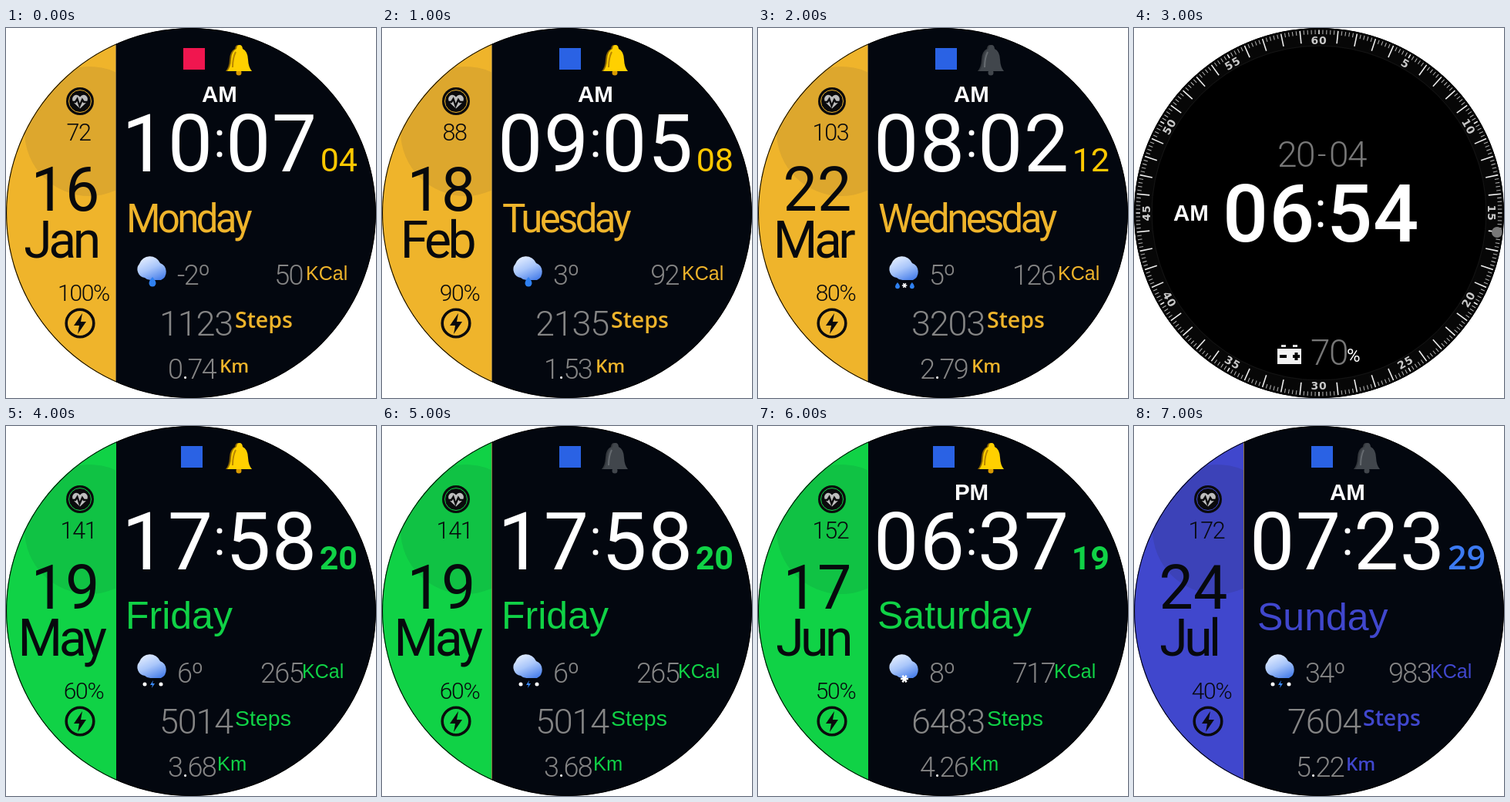
Animation, 480 px wide and 480 px high, one loop 8 s. Source, as an HTML page:

```html
<!DOCTYPE html>
<html lang="en">
<head>
<meta charset="utf-8">
<title>Watch face</title>
<style>
html, body { margin: 0; width: 100%; height: 100%; overflow: hidden; background: #fff; }
svg { display: block; width: 100vw; height: 100vh; }
text { font-family: Roboto, sans-serif; white-space: pre; }
.arial { font-family: "Liberation Sans", Arial, sans-serif; }
.open { font-family: "Open Sans", "Noto Sans", sans-serif; }
.ring { font-family: "DejaVu Sans", sans-serif; font-weight: 700; }
.scene { visibility: hidden; animation: show 8s step-end infinite; }
@keyframes show {
  0% { visibility: visible; }
  12.5%, 100% { visibility: hidden; }
}
</style>
</head>
<body>
<svg id="stage" viewBox="0 0 480 480">
  <defs>
    <clipPath id="dial"><circle cx="240" cy="240" r="240"/></clipPath>
    <clipPath id="side"><rect width="142" height="480"/></clipPath>
    <linearGradient id="sky" x1=".2" y1="0" x2=".75" y2="1">
      <stop offset="0" stop-color="#e6efff"/>
      <stop offset=".5" stop-color="#a9c6fa"/>
      <stop offset="1" stop-color="#4a80ea"/>
    </linearGradient>
    <path id="cloud" fill="url(#sky)" d="M180 324a11 11 0 0 1-7-18a14.500 14.500 0 0 1 27-1a12 12 0 0 1 1 22h-12a11 11 0 0 1-9-3z"/>
    <path id="drop" d="M0-6q4.500 5 4.500 8a4.500 4.500 0 0 1-9 0q0-3 4.500-8z" fill="#2f80f0"/>
    <path id="flake" d="M-5 0H5M-2.500-4.300L2.500 4.300M2.500-4.300L-2.500 4.300" stroke="#fff" stroke-width="2.400"/>
    <path id="flash" d="M1-5L-3 1H0L-1 5L3-1H0z" fill="#3b8cff"/>
    <path id="bell" d="M302 22q3.500 0 4 5q6.500 3 7 14q.5 10 5 15H286q4.500-5 5-15q.5-11 7-14q.5-5 4-5z"/>
  </defs>
  <g clip-path="url(#dial)">
    <g id="face"></g>
    <circle cx="240" cy="240" r="239.500" fill="none" stroke="#000" stroke-width="1.200"/>
  </g>
</svg>
<script>
const themes = {
  gold: { main: '#efb42b', mark: '#dda72d', sec: '#ffc800', secFont: '', secWeight: 400, edge: 142, unit: 'open', kcalX: 389, kmX: 277 },
  green: { main: '#10d246', mark: '#10c244', sec: '#10d246', secFont: '', secWeight: 700, edge: 143, unit: 'arial', kcalX: 384, kmX: 274 },
  blue: { main: '#4047cd', mark: '#3c42b8', sec: '#3c7af2', secFont: 'open', secWeight: 600, edge: 142, unit: 'open', kcalX: 384, kmX: 275 }
};

const scenes = [
  { theme: 'gold', hour: '10', min: '07', sec: '04', half: 'AM', day: 'Monday', date: 16, month: 'Jan', pulse: 72,
    battery: 100, temp: '-2', kcal: 50, steps: 1123, km: '0.74', sky: 'rain', bell: true, link: '#f0164f' },
  { theme: 'gold', hour: '09', min: '05', sec: '08', half: 'AM', day: 'Tuesday', date: 18, month: 'Feb', pulse: 88,
    battery: 90, temp: '3', kcal: 92, steps: 2135, km: '1.53', sky: 'rain', bell: true },
  { theme: 'gold', hour: '08', min: '02', sec: '12', half: 'AM', day: 'Wednesday', date: 22, month: 'Mar', pulse: 103,
    battery: 80, temp: '5', kcal: 126, steps: 3203, km: '2.79', sky: 'sleet' },
  null,
  { theme: 'green', hour: '17', min: '58', sec: '20', half: '', day: 'Friday', date: 19, month: 'May', pulse: 141,
    battery: 60, temp: '6', kcal: 265, steps: 5014, km: '3.68', sky: 'storm', bell: true },
  null,
  { theme: 'green', hour: '06', min: '37', sec: '19', half: 'PM', day: 'Saturday', date: 17, month: 'Jun', pulse: 152,
    battery: 50, temp: '8', kcal: 717, steps: 6483, km: '4.26', sky: 'snow', bell: true },
  { theme: 'blue', hour: '07', min: '23', sec: '29', half: 'AM', day: 'Sunday', date: 24, month: 'Jul', pulse: 172,
    battery: 40, temp: '34', kcal: 983, steps: 7604, km: '5.22', sky: 'storm' }
];
scenes[5] = { ...scenes[4], bell: false, line: true };

const text = (str, x, y, size, fill, { cls = '', weight = 400, anchor = 'start', gap = 0 } = {}) =>
  `<text class="${cls}" x="${x}" y="${y}" font-size="${size}" fill="${fill}" font-weight="${weight}" ` +
  `text-anchor="${anchor}" letter-spacing="${gap}">${str}</text>`;
const rect = (x, y, w, h, fill) => `<rect x="${x}" y="${y}" width="${w}" height="${h}" fill="${fill}"/>`;
const disc = (x, y, r, fill, extra = '') => `<circle cx="${x}" cy="${y}" r="${r}" fill="${fill}" ${extra}/>`;
const use = (id, x = 0, y = 0, extra = '') => `<use href="#${id}" transform="translate(${x} ${y})" ${extra}/>`;

function clock(hour, min, x, y, weight) {
  const opt = { weight, gap: 1.2 };
  return text(hour, x, y, 104, '#fff', opt) + text(min, x + 135, y, 104, '#fff', opt) +
    disc(x + 127, y - 50, 3.5, '#fff') + disc(x + 127, y - 22, 3.5, '#fff');
}

const fall = {
  rain: use('drop', 190, 329),
  sleet: `<g transform="translate(181 334) scale(.65)">${use('drop')}${use('flake', 14)}${use('drop', 29)}</g>`,
  storm: disc(180, 335, 2.5, '#fff') + use('flash', 190, 335) + disc(201, 335, 2.5, '#fff'),
  snow: use('flake', 190, 328)
};

function bell(on) {
  const [back, body, shine, clapper] = on
    ? ['#8a6500', '#ffd000', '#b98700', '#d99a00']
    : ['#34383d', '#41464c', '#666b70', '#41464c'];
  return use('bell', -1, 0, `fill="${back}"`) + disc(302, 58, 3.5, clapper) + use('bell', 1, 0, `fill="${body}"`) +
    `<path d="M298 31q-4 8-4 20" fill="none" stroke="${shine}" stroke-width="2"/>`;
}

function sideIcons(color) {
  return disc(96, 95, 18, '#0a0a0c') + disc(96, 95, 14.5, 'none', `stroke="${color}" stroke-width="1"`) +
    '<path d="M96 104.500l-8-7.500q-4-5 0-9q4.500-3 8 1.500q3.500-4.500 8-1.500q4 4 0 9z" fill="#bdbdbd"/>' +
    '<path d="M83 96h7l2.500-4l3 9l3.500-8l2 3h8" fill="none" stroke="#0a0a0c" stroke-width="2.400"/>' +
    disc(96, 383, 17.8, 'none', 'stroke="#0a0a0c" stroke-width="3.6"') +
    '<path d="M99 370L88 386h7l-2 11l11-16h-7z" fill="#0a0a0c"/>';
}

function weekday(s, t) {
  if (s.theme === 'gold') return text(s.day, 156, 265, 51, t.main, { gap: -3.7 });
  return text(s.day, s.theme === 'blue' ? 160 : 155, s.theme === 'blue' ? 265 : 263, 50, t.main, { cls: 'arial' });
}

function mainFace(s) {
  const t = themes[s.theme], ink = '#07090d', gray = '#858585';
  const mid = { weight: 300, anchor: 'middle', gap: -1.3 };
  const small = { weight: 300, gap: -1.6 };
  const open = t.unit === 'open';
  const unit = { cls: t.unit, weight: open ? 600 : 400 };
  const line = t.edge === 142 || s.line;
  const [whole, part] = s.km.split('.');
  return rect(0, 0, 480, 480, '#03070f') + rect(0, 0, t.edge, 480, t.main) +
    disc(108, 134, 84, t.mark, 'clip-path="url(#side)"') +
    (line ? rect(142, 0, 1, 480, '#8d7440') : '') +
    sideIcons(t.main) +
    text(s.pulse, 94, 146, 30.5, ink, mid) +
    text(s.date, 77, 237, 79, ink, { anchor: 'middle' }) +
    text(s.month, 71, 298, 66, ink, { anchor: 'middle', gap: -4.5 }) +
    text(s.battery + '%', 100.5, 354, 30, ink, mid) +
    rect((line ? 244 : 241) - 14, 26, 28, 28, s.link || '#2a62e4') + bell(s.bell) +
    text(s.half, 277, 96, 29.5, '#fff', { cls: 'arial', weight: 700, anchor: 'middle' }) +
    clock(s.hour, s.min, 150, 186, 400) +
    text(s.sec, 456, 186, 43, t.sec, { weight: t.secWeight, anchor: 'end', cls: t.secFont }) +
    weekday(s, t) +
    use('cloud') + fall[s.sky] +
    text(s.temp + 'º', 222, 332.5, 36, gray, small) +
    text(s.kcal, 385, 332.5, 36, gray, { ...small, anchor: 'end' }) +
    text('KCal', t.kcalX, 327, 25, t.main, { cls: 'arial' }) +
    text(s.steps, 199, 399, 45, gray, { weight: 300, gap: -1.2 }) +
    text('Steps', 297, 389, 28.5, t.main, unit) +
    text(`${whole}<tspan fill="#fff">.</tspan>${part}`, 210, 455, 36, gray, small) +
    text('Km', t.kmX, 447, open ? 24 : 25.5, t.main, unit);
}

function bezel() {
  let out = disc(240, 240, 228, 'none', 'stroke="#070707" stroke-width="24"') +
    disc(240, 240, 217, 'none', 'stroke="#1a1a1a" stroke-width=".7"');
  const tick = (deg, from, width, color) =>
    `<path d="M240 ${from}V2.500" stroke="${color}" stroke-width="${width}" transform="rotate(${deg} 240 240)"/>`;
  for (let i = 0; i < 300; i++) {
    const label = i % 25 === 0, minute = i % 5 === 0;
    out += tick(i * 1.2, minute && !label ? 19 : 8, minute ? 1.6 : 1.1, minute ? '#eee' : '#aaa');
  }
  for (let n = 5; n <= 60; n += 5) {
    const deg = n * 6, a = deg * Math.PI / 180;
    const x = 240 + 224 * Math.sin(a), y = 240 - 224 * Math.cos(a);
    const turn = n > 15 && n < 45 ? deg - 180 : deg;
    out += `<g transform="translate(${x.toFixed(2)} ${y.toFixed(2)}) rotate(${turn})">` +
      text(n, 0, 5, 14, '#c8c8c8', { cls: 'ring', anchor: 'middle', gap: 0.8 }) + '</g>';
  }
  return out;
}

function dimFace() {
  const gray = '#777', mid = { weight: 300, anchor: 'middle', gap: -1.5 };
  return rect(0, 0, 480, 480, '#000') + bezel() + disc(471, 265, 7, gray) +
    text('20', 210, 180, 46, gray, mid) + text('-', 243, 178, 40, gray, mid) + text('04', 277, 180, 46, gray, mid) +
    text('AM', 74, 250, 29.5, '#fff', { cls: 'arial', weight: 700, anchor: 'middle' }) +
    clock('06', '54', 115, 277, 500) +
    rect(186, 416, 31, 20, '#f2f2f2') + rect(191, 411, 6, 3, '#ddd') + rect(206, 411, 6, 3, '#ddd') +
    rect(189, 424, 9, 4, '#000') + rect(206, 424, 9, 4, '#000') + rect(208.5, 421, 4, 10, '#000') +
    text('70', 253, 437, 46, gray, mid) +
    text('%', 276, 433, 24, '#fff');
}

document.getElementById('face').innerHTML = scenes.map((s, i) =>
  `<g class="scene" style="animation-delay:${i - 8}s">${s ? mainFace(s) : dimFace()}</g>`).join('');
</script>
</body>
</html>
```
